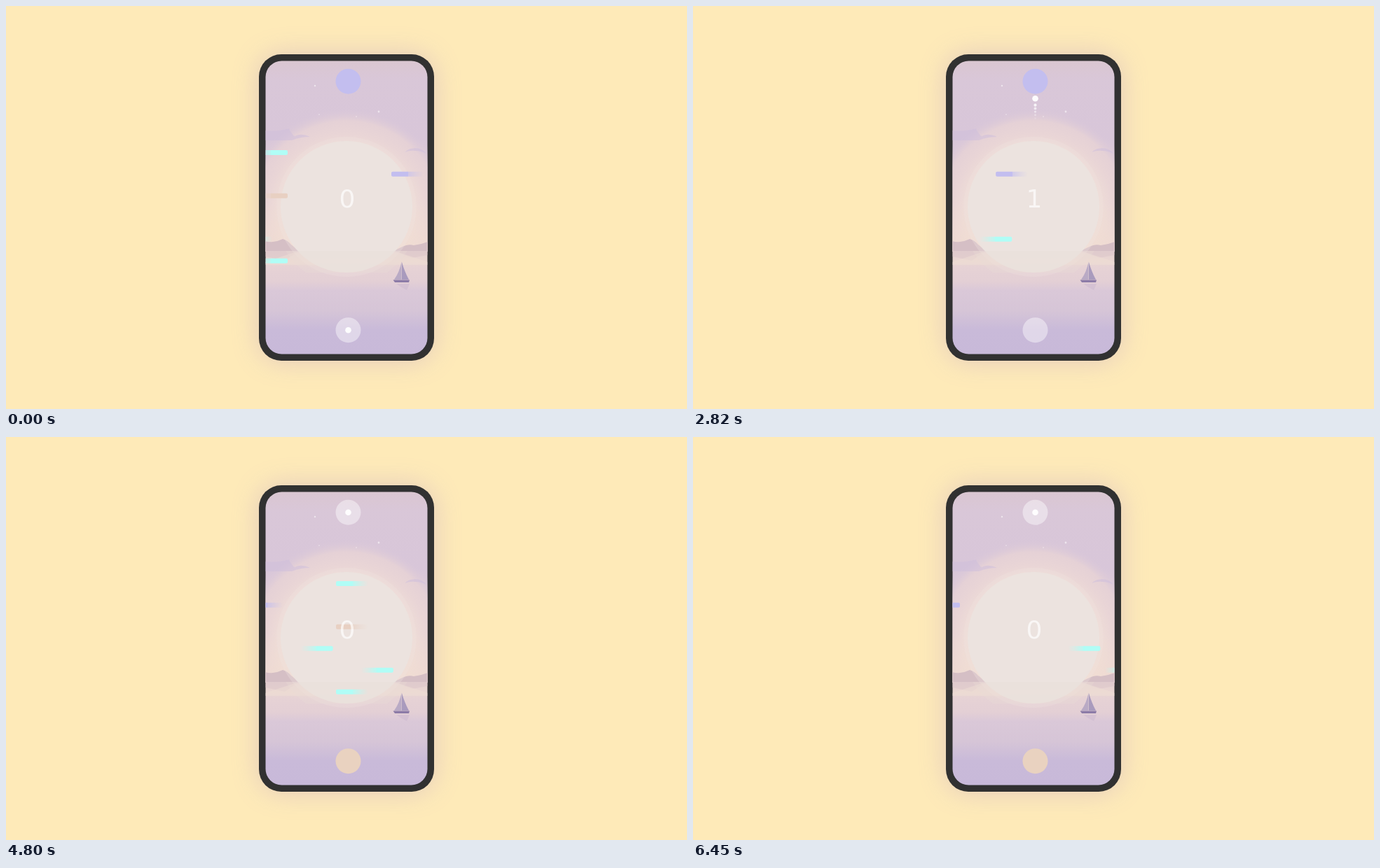
An HTML page that plays this animation: 972 px wide and 576 px high, repeating every 6480 ms.

```html
<!DOCTYPE html>
<html lang="en">
<head>
<meta charset="utf-8">
<title>Colour match game</title>
<style>
  html, body { margin: 0; width: 100%; height: 100%; overflow: hidden; background: #feeab8; }
  svg { display: block; width: 972px; height: 576px; }
  #score { font: 36px "DejaVu Sans", Verdana, sans-serif; text-anchor: middle; fill: #fff; fill-opacity: .68; }
</style>
</head>
<body>
<svg viewBox="0 0 972 576">
  <defs>
    <clipPath id="screen"><rect x="370.5" y="78.5" width="231" height="419" rx="23"/></clipPath>
    <filter id="blur" x="-50%" y="-50%" width="200%" height="200%"><feGaussianBlur stdDeviation="19"/></filter>
    <linearGradient id="sky" x2="0" y2="1">
      <stop offset="0" stop-color="#dac6d1"/>
      <stop offset=".1" stop-color="#d9c7d8"/>
      <stop offset=".4" stop-color="#d8c6d9"/>
      <stop offset=".7" stop-color="#e4d0d7"/>
      <stop offset="1" stop-color="#ecdad5"/>
    </linearGradient>
    <radialGradient id="glow" gradientUnits="userSpaceOnUse" cx="486" cy="298" r="152">
      <stop offset=".64" stop-color="#eedcd7"/>
      <stop offset=".76" stop-color="#e9d5d6"/>
      <stop offset=".88" stop-color="#e5d1d6"/>
      <stop offset="1" stop-color="#d9c7d9" stop-opacity="0"/>
    </radialGradient>
    <linearGradient id="dusk" x2="0" y2="1">
      <stop offset="0" stop-color="#f1ddd2" stop-opacity="0"/>
      <stop offset="1" stop-color="#f1ddd2" stop-opacity=".85"/>
    </linearGradient>
    <linearGradient id="sea" x2="0" y2="1">
      <stop offset="0" stop-color="#e4d0d2"/>
      <stop offset=".1" stop-color="#ead7d2"/>
      <stop offset=".16" stop-color="#e6d2d5"/>
      <stop offset=".3" stop-color="#e3cfd5"/>
      <stop offset=".38" stop-color="#dac8d8"/>
      <stop offset=".58" stop-color="#d6c5d7"/>
      <stop offset=".76" stop-color="#c9bad9"/>
      <stop offset="1" stop-color="#c8b9d9"/>
    </linearGradient>
  </defs>

  <rect x="361" y="69" width="250" height="438" rx="32" fill="#bb9cc4" opacity=".42" filter="url(#blur)"/>
  <rect x="361" y="69" width="250" height="438" rx="32" fill="#313131"/>

  <g clip-path="url(#screen)">
    <rect x="370" y="78" width="232" height="273" fill="url(#sky)"/>
    <rect x="370" y="78" width="232" height="273" fill="url(#glow)"/>
    <rect x="370" y="280" width="232" height="71" fill="url(#dusk)"/>
    <g fill="#fff" opacity=".55">
      <circle cx="441" cy="114" r="1.2"/>
      <circle cx="532" cy="151" r="1.4"/>
      <circle cx="447" cy="155" r=".8"/>
      <circle cx="500" cy="158" r=".8"/>
    </g>
    <g fill="#cfc0dc" opacity=".55">
      <path d="M370 192V178Q386 180 404 175Q408 184 412 186Q422 181 434 187Q420 187 408 192Z"/>
      <path d="M569 209Q575 203 584 203Q594 203 600 211Q592 207 584 207Q577 206 569 209Z"/>
    </g>

    <rect x="370" y="350" width="232" height="148" fill="url(#sea)"/>
    <path d="M418 350L398 364L370 358V350Z M553 350L580 360L602 356V350Z" fill="#dcc6cb" opacity=".55"/>
    <path d="M370 370H602V366L560 352H412L370 366Z" fill="#f0dfd5" opacity=".5"/>
    <path d="M370 350V336Q376 338 381 337Q389 336 395 333Q402 335 407 341L418 350Z M553 350L568 343Q575 340 582 342Q592 341 602 337V350Z" fill="#d5bfc5"/>
    <circle cx="486" cy="287" r="100" fill="#eee2df" opacity=".3"/>
    <circle cx="486" cy="287" r="94" fill="#ece4e0" opacity=".92"/>
    <path d="M399 350H573A108 108 0 0 1 544 381H428A108 108 0 0 1 399 350Z" fill="#e8d9d5" opacity=".3"/>

    <path d="M557 397H576L572 406Q565 403 557 397Z" fill="#c5b2cc" opacity=".4"/>
    <path d="M564.5 365V391H554Q562 380 564.5 365Z" fill="#b9aac5"/>
    <path d="M565 366Q569 380 575 391H565Z" fill="#a99bbd"/>
    <path d="M552.5 391.5H576L575 395H555Z" fill="#8c7ba7"/>

    <circle id="top" cx="488.5" cy="107.7" r="18"/>
    <circle id="bottom" cx="488.5" cy="463.2" r="18"/>
    <g id="bars"></g>
    <text id="score" x="487" y="288">0</text>
    <g id="trail"></g>
    <circle id="ball" cx="488.5" r="4.3" fill="#fff" fill-opacity=".95"/>
  </g>
</svg>
<script>
const LOOP = 6480, STEP = 30;
const TOP_Y = 107.7, BOTTOM_Y = 463.2, BALL_SPEED = 0.2056;
const LAUNCH_UP = 1210, CATCH = 1965, LAND = 2939, LAUNCH_DOWN = 4320, MISS = 4772;
const COLORS = { cyan: [176, 253, 246], violet: [195, 190, 239], peach: [232, 208, 194] };
const WHITE = [255, 255, 255, 0.42];
const TARGET = [233, 210, 192, 1];
const VIOLET = [...COLORS.violet, 1];

const $ = id => document.getElementById(id);
const clamp = v => Math.max(0, Math.min(1, v));
const rgba = c => `rgba(${c})`;
const mix = (a, b, k) => rgba(a.map((v, i) => v + (b[i] - v) * k));

function make(tag, attrs, parent) {
  const node = document.createElementNS("http://www.w3.org/2000/svg", tag);
  for (const key in attrs) node.setAttribute(key, attrs[key]);
  return parent.appendChild(node);
}

const defs = document.querySelector("defs");
for (const name in COLORS) {
  const grad = make("linearGradient", { id: name }, defs);
  const mid = name === "cyan" ? 0.85 : 0.65;
  for (const [offset, alpha] of [[0, 0], [0.2, mid * 0.35], [0.48, mid], [0.48, 1], [1, 1]])
    make("stop", { offset, "stop-color": rgba(COLORS[name]), "stop-opacity": alpha }, grad);
}

// A bar's head is at x when the clock reads at; dir is its heading.
const bar = (row, color, dir, x, at, speed, until = LOOP) => ({
  row, dir, x, at, speed, until,
  node: make("rect", { x: -46, y: -3.5, width: 46, height: 7, rx: 2, fill: `url(#${color})` }, $("bars"))
});
const bars = [
  bar(1, "violet", -1, 550, 0, 0.0418),
  bar(1, "violet", 1, 381, 6450, 0.0418),
  bar(3, "violet", -1, 578, 720, 0.0696, CATCH),
  bar(3, "cyan", 1, 427, 4230, 0.0695),
  bar(4, "cyan", -1, 334, 0, 0.049),
  bar(4, "cyan", 1, 402, 1740, 0.0493)
];
for (const [row, color] of [[0, "cyan"], [2, "peach"], [5, "cyan"]])
  bars.push(bar(row, color, 1, 402, 0, 0.0973), bar(row, color, -1, 527, 4230, 0.0982));

const dots = Array.from({ length: 5 }, (_, i) =>
  make("circle", { cx: 488.5, r: 2.1 - i * 0.2, fill: "#fff", "fill-opacity": 0.8 - i * 0.16 }, $("trail")));

function ballState(t) {
  if (t < LAUNCH_UP) return [BOTTOM_Y, 0];
  if (t < LAND) return [BOTTOM_Y - (t - LAUNCH_UP) * BALL_SPEED, -1];
  if (t < LAUNCH_DOWN || t >= MISS) return [TOP_Y, 0];
  return [TOP_Y + (t - LAUNCH_DOWN) * BALL_SPEED, 1];
}

function render(t) {
  for (const b of bars) {
    const x = b.x + b.dir * b.speed * (t - b.at);
    b.node.setAttribute("transform", `translate(${x} ${209.4 + b.row * 30.96}) scale(${b.dir} 1)`);
    b.node.setAttribute("visibility", t < b.until ? "visible" : "hidden");
  }

  const [y, heading] = ballState(t);
  $("ball").setAttribute("cy", y);
  $("trail").setAttribute("visibility", heading ? "visible" : "hidden");
  dots.forEach((dot, i) => dot.setAttribute("cy", y - heading * (9.5 + i * 4.7)));

  const swap = clamp((t - LAND) / 200);
  $("top").setAttribute("fill", mix(VIOLET, WHITE, swap));
  $("bottom").setAttribute("fill", mix(WHITE, TARGET, swap));
  $("score").textContent = t >= CATCH && t < MISS ? "1" : "0";
}

const start = performance.now();
function tick() {
  const t = (performance.now() - start) % LOOP;
  render(Math.floor(t / STEP) * STEP);
  requestAnimationFrame(tick);
}
tick();
</script>
</body>
</html>
```
